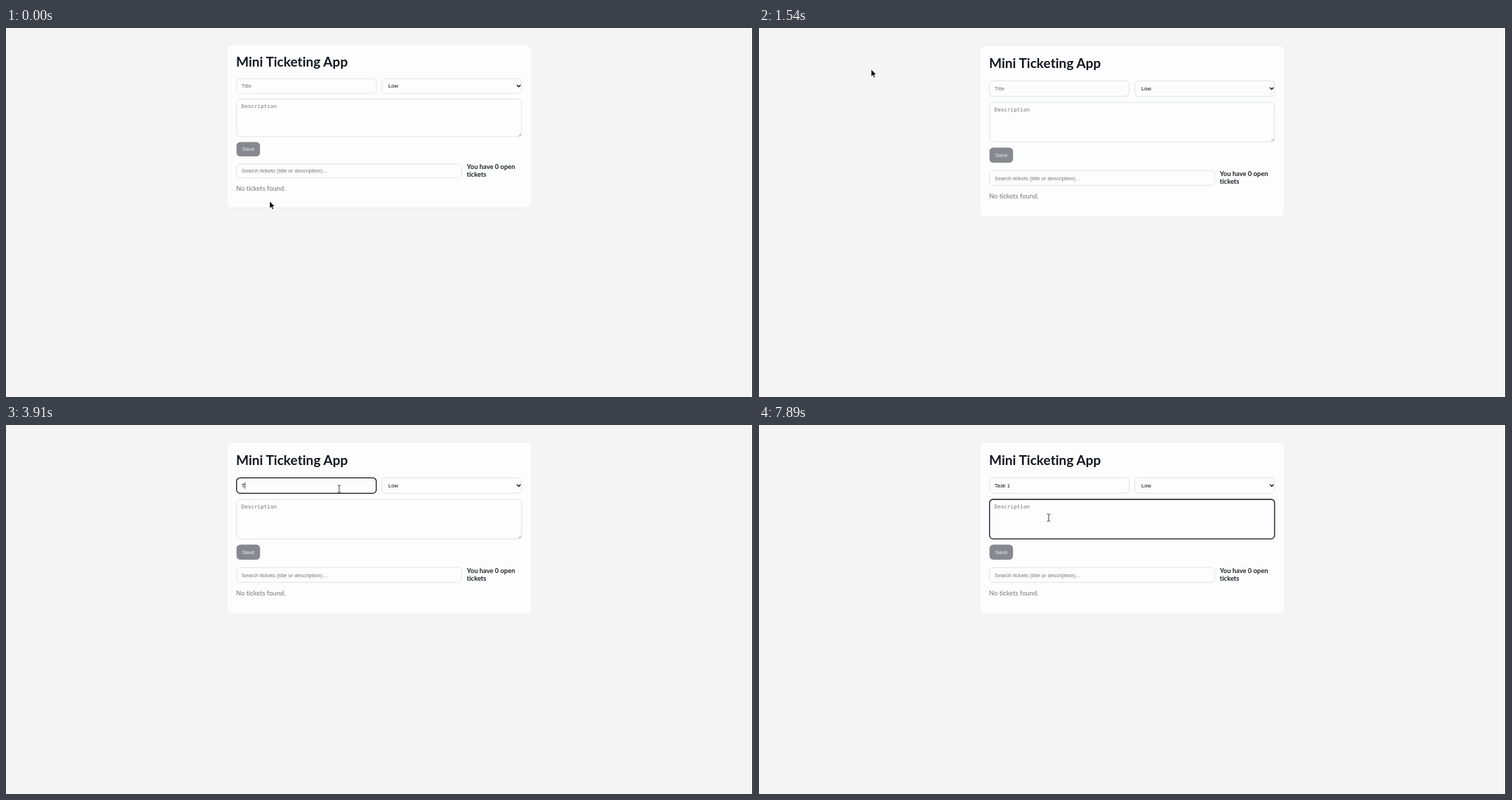
Write an HTML page that moves like this. It is 1065 px wide and 526 px high and loops after 8 s.

```html
<!DOCTYPE html>
<html lang="en">
<head>
<meta charset="utf-8">
<title>Mini Ticketing App</title>
<style>
  html, body { margin: 0; width: 100%; height: 100%; overflow: hidden; background: #f4f4f4; }
  svg { display: block; width: 1065px; height: 526px; }
  text { font: 7.66px "Liberation Sans", Arial, sans-serif; fill: #757575; white-space: pre; }
  .ui { font: 9.4px Lato, sans-serif; font-variant-ligatures: none; }
  .bold { font-weight: 700; fill: #1b1f27; }
  .title { font-size: 19.1px; fill: #111820; }
  .mono { font: 7.63px "DejaVu Sans Mono", monospace; }
  .dark { fill: #0c0c0e; }
  .field { fill: #fdfdfd; stroke: #d9dbe3; stroke-width: .8; }
  .field.focus { stroke: #10121c; stroke-width: 1.3; }
</style>
</head>
<body>
<svg viewBox="0 0 1065 526">
  <g id="page">
    <rect x="315" y="24.5" width="434.3" height="244.5" rx="7.5" fill="#fdfdfd" stroke="#ededf0" stroke-width=".8"/>
    <text class="ui bold title" x="328" y="57">Mini Ticketing App</text>

    <rect class="field" id="title" x="328.7" y="75.3" width="199.2" height="22" rx="5"/>
    <text id="titleText" x="335.8" y="89"></text>

    <rect class="field" id="priority" x="535.9" y="75.3" width="199.2" height="22" rx="5"/>
    <text class="dark" x="545" y="89">Low</text>
    <path d="M728.4 84.8l2.6 2.6 2.6-2.6" fill="none" stroke="#111" stroke-width="1.4"/>

    <rect class="field" id="details" x="328.7" y="106" width="406.4" height="56.3" rx="5"/>
    <text class="mono" x="335.6" y="119">Description</text>
    <path d="M730.5 161.5l4-4M732.8 161.5l1.8-1.8" stroke="#85858a" stroke-width=".7"/>

    <rect x="328.6" y="170.4" width="33.6" height="21.6" rx="5.5" fill="#87898e"/>
    <text x="336.7" y="184" style="fill:#ededf0">Save</text>

    <rect class="field" id="search" x="328.7" y="203.1" width="321" height="21.2" rx="5"/>
    <text x="335.8" y="216.5">Search tickets (title or description)…</text>
    <text class="ui bold" x="657" y="211">You have 0 open</text>
    <text class="ui bold" x="657" y="222.3">tickets</text>
    <text class="ui" x="328" y="243.4">No tickets found.</text>
    <rect id="caret" width=".8" height="9" fill="#111"/>
  </g>
  <rect x="1064" width="1" height="526" fill="#000"/>
  <path id="arrow" d="M0 0V10.2L2.3 8.1 3.9 11.7 5.6 11 4 7.5H7.2Z" fill="#000" stroke="#fff" stroke-width=".6"/>
  <path id="beam" d="M-2.4-5.2Q0-5.2 0-4.2Q0-5.2 2.4-5.2M0-4.2V4.2M-2.4 5.2Q0 5.2 0 4.2Q0 5.2 2.4 5.2" fill="none" stroke="#3c3c40" stroke-width="1"/>
</svg>
<script>
const LOOP = 8000;
const $ = id => document.getElementById(id);
const between = (t, a, b) => t >= a && t < b;
const show = (el, on) => el.setAttribute("visibility", on ? "visible" : "hidden");

// Pointer stops: time, x, y
const stops = [
  [0, 376, 247], [190, 376, 247], [280, 386, 241], [450, 400, 228], [700, 400, 228],
  [1540, 160, 59], [2000, 515, 94], [2170, 515, 94], [2620, 495, 88], [2830, 475, 91],
  [7030, 475, 91], [7360, 413, 132], [LOOP, 413, 132]
];
const typed = [[3910, "T"], [4230, "Ta"], [4410, "Tas"], [4850, "Task"], [5390, "Task "], [5620, "Task 1"]];
const textAreas = [[328, 75, 528, 98], [328, 105, 736, 163], [328, 203, 650, 225], [328, 234, 736, 246], [328, 38, 736, 62]];

function pointerAt(t) {
  const i = stops.findIndex(s => s[0] > t);
  const [t0, x0, y0] = stops[i - 1], [t1, x1, y1] = stops[i];
  const p = (t - t0) / (t1 - t0), e = p * p * (3 - 2 * p);
  return [x0 + (x1 - x0) * e, y0 + (y1 - y0) * e];
}

function drawPointer(t) {
  const [x, y] = pointerAt(t);
  const overText = textAreas.some(([l, top, r, b]) => x > l && x < r && y > top && y < b);
  const visible = !between(t, 5330, 7030);
  for (const id of ["arrow", "beam"]) {
    $(id).setAttribute("transform", `translate(${x} ${y})`);
    show($(id), visible && overText === (id === "beam"));
  }
}

function draw(t) {
  // The page is slightly shorter until the window settles
  $("page").setAttribute("transform", t < 190 ? "translate(0 .7) scale(1 .95)" : "");

  const focus = t < 2830 ? "" : t < 6120 ? "title" : t < 7380 ? "priority" : "details";
  for (const id of ["title", "priority", "details"]) $(id).classList.toggle("focus", id === focus);

  const value = typed.reduce((s, [at, text]) => t >= at ? text : s, "");
  const label = $("titleText");
  label.textContent = value || "Title";
  label.setAttribute("class", value ? "dark" : "");

  const caret = $("caret"), inDetails = focus === "details";
  const caretX = 335.6 + (value && !inDetails ? label.getComputedTextLength() : 0);
  caret.setAttribute("x", caretX);
  caret.setAttribute("y", inDetails ? 111.5 : 81.7);
  show(caret, between(t, 2830, 3330) || between(t, 3910, 5330) || between(t, 5390, 6120) || between(t, 7380, 7890));

  drawPointer(t);
}

function tick() {
  draw(performance.now() % LOOP);
  requestAnimationFrame(tick);
}
tick();
</script>
</body>
</html>
```
